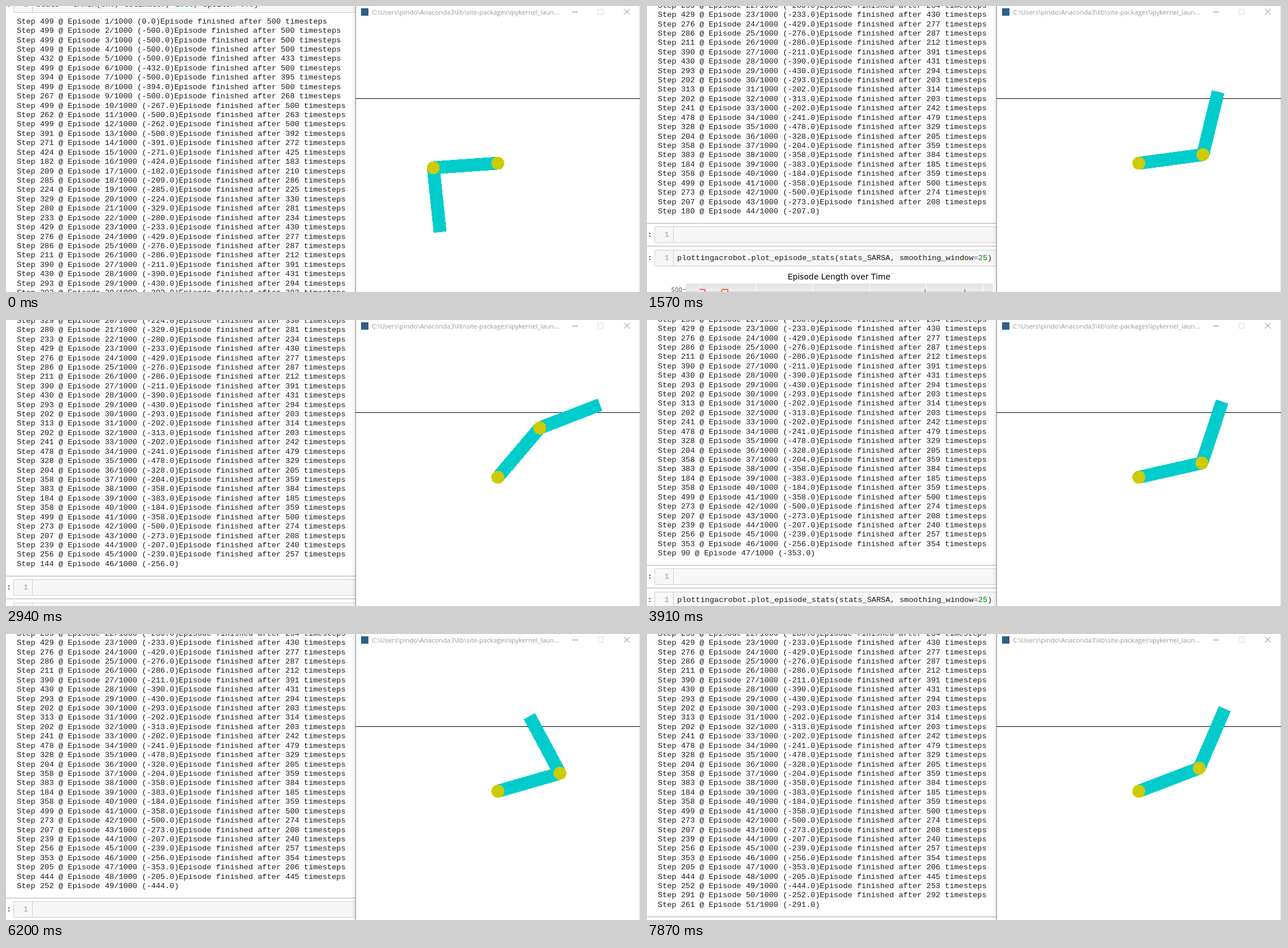
Write an HTML page that moves like this. It is 1116 px wide and 502 px high and loops after 7990 ms.

```html
<!DOCTYPE html>
<html lang="en">
<head>
<meta charset="utf-8">
<title>Acrobot training</title>
<style>
html, body { margin: 0; width: 100%; height: 100%; overflow: hidden; background: #fff; }
#stage { position: relative; width: 1116px; height: 502px; overflow: hidden; background: #fff; }
#stage div, pre, svg { position: absolute; margin: 0; }
pre, .code, .num, .prompt {
  font: 13.57px/16.42px "Liberation Mono", "Courier New", monospace;
  white-space: pre; color: #1c1c1c;
}
#notebook { left: 0; top: 0; width: 614px; height: 502px; overflow: hidden; }
#log { left: 19px; top: 19.8px; }
#page, #below { left: 0; top: 0; width: 614px; }
.rule { left: 0; width: 614px; height: 1px; background: #ababab; }
.cell {
  left: 13px; width: 620px; height: 27px;
  border: 1px solid #cfcfcf; border-radius: 2px; background: #f7f7f7;
}
.gutter { left: 0; top: 0; width: 32px; height: 27px; border-right: 1px solid #cfcfcf; }
#stage .num { right: 7px; top: 6px; color: #999; }
.code { left: 39px; top: 6px; }
#stage .prompt { left: -13px; top: 6px; color: #000080; }
.code i { font-style: normal; color: #aa22ff; }
.code b { font-weight: normal; color: #008800; }
#window {
  left: 614px; top: 0; width: 499px; height: 502px; background: #fff;
  border-left: 1px solid #8c8c8c; border-right: 1px solid #a0a0a0;
  box-shadow: -2px 0 5px rgba(0, 0, 0, .14);
}
#title {
  left: 28px; top: 2px; white-space: nowrap; color: #999;
  font: 11.5px/17px "Open Sans", "Noto Sans", sans-serif;
}
#icon { left: 9px; top: 4px; width: 13px; height: 13px; background: #2f5f86; }
svg { left: 0; top: 0; }
</style>
</head>
<body>
<div id="stage">
  <div id="notebook">
    <div id="page">
      <div class="cell" style="top:-17px">
        <div class="gutter"><div class="num">1</div></div>
        <div class="prompt">:</div>
        <div class="code">stats = SARSA(env, estimator, <b>1000</b>, epsilon<i>=</i><b>0.0</b>)</div>
      </div>
      <pre id="log"></pre>
      <div id="below">
        <div class="rule" style="top:0"></div>
        <div class="cell" style="top:6px">
          <div class="gutter"><div class="num">1</div></div>
          <div class="prompt">:</div>
        </div>
        <div class="rule" style="top:40px"></div>
        <div class="cell" style="top:47px">
          <div class="gutter"><div class="num">1</div></div>
          <div class="prompt">:</div>
          <div class="code">plottingacrobot.plot_episode_stats(stats_SARSA, smoothing_window<i>=</i><b>25</b>)</div>
        </div>
        <svg style="top:80px" width="614" height="140" font-family="DejaVu Sans, sans-serif">
          <text x="337.5" y="19" font-size="13.9" text-anchor="middle">Episode Length over Time</text>
          <path d="M68 26H608V140H68Z" fill="#e5e5e5"/>
          <path d="M92.5 26V140M191.5 26V140M291.5 26V140M391.5 26V140M490.5 26V140M590.5 26V140M68 36.5H608" stroke="#fff"/>
          <path d="M64 36.5H68" stroke="#555"/>
          <text x="62" y="40.5" font-size="10.2" fill="#555" text-anchor="end">500</text>
          <path d="M92 36.5H102V140M130 42L132 36.5H142V140M489 140V36M558.5 140V36" fill="none" stroke="#e24a33" stroke-width="1.4"/>
        </svg>
      </div>
    </div>
  </div>
  <div id="window">
    <div id="icon"></div>
    <div id="title">C:\Users\pindo\Anaconda3\lib\site-packages\ipykernel_laun...</div>
  </div>
  <svg width="1116" height="502">
    <g fill="none" shape-rendering="crispEdges">
      <path d="M995 10.5H1005" stroke="#888"/>
      <path d="M1040.5 5.5H1049.5V14.5H1040.5Z" stroke="#ddd"/>
      <path d="M614 162.5H1114" stroke="#000"/>
    </g>
    <path d="M1086 5L1096 15M1096 5L1086 15" stroke="#888"/>
    <defs>
      <g id="link">
        <rect y="-11.36" width="113.6" height="22.72" fill="#00cccc"/>
        <circle r="11.36" fill="#cccc00"/>
      </g>
    </defs>
    <g id="upper" shape-rendering="crispEdges">
      <use href="#link"/>
      <use href="#link" id="lower"/>
    </g>
  </svg>
</div>
<script>
const LOOP = 7990, REFRESH = 135, ROW = 16.42, LINK = 113.6;
const $ = id => document.getElementById(id);

// The text of the log: the last step reached in each episode.
const lastSteps = [
  499, 499, 499, 499, 432, 499, 394, 499, 267, 499, 262, 499, 391, 271, 424, 182, 209,
  285, 224, 329, 280, 233, 429, 276, 286, 211, 390, 430, 293, 202, 313, 202, 241, 478,
  328, 204, 358, 383, 184, 358, 499, 273, 207, 239, 256, 353, 205, 444, 252, 291, 499];
const starts = [0];
lastSteps.forEach((s, i) => starts.push(starts[i] + s + 1));

// The screen freezes during these spans.
const stalls = [[160, 870], [2510, 2940], [5670, 5950], [6200, 6470]];

// Steps run at a nearly even pace through these points: time, episode, step.
const progress = [
  [0, 42, 235], [1545, 44, 180], [2510, 45, 256], [2940, 46, 144], [3885, 47, 90],
  [5370, 48, 432], [6200, 49, 252], [7010, 50, 264], [7820, 51, 261]
].map(([t, episode, step]) => [t, starts[episode - 1] + step]);

const scroll = [[700, 0], [1140, 373], [2510, 373], [2940, 338], [3210, 373]];

// Link angles; the arm is redrawn only as an episode ends.
const FIRST_POSE = 42, POSE_LEAD = 20;
const poses = [
  [176, 84], [-63, -113], [-7.6, -76.4], [-12, -70], [-49.6, -21.1],
  [-12.7, -71.7], [-18, -85], [-8.6, -60], [-16.1, -118.2], [-20.9, -66.7]];

function interpolate(keys, t) {
  const i = keys.findIndex(k => k[0] >= t);
  if (i < 0) return keys[keys.length - 1][1];
  if (i === 0) return keys[0][1];
  const [t0, a] = keys[i - 1], [t1, b] = keys[i];
  return a + (b - a) * (t - t0) / (t1 - t0);
}

function lastRefresh(t) {
  let resumed = 0;
  for (const [from, to] of stalls) {
    if (t < from) break;
    if (t < to) return from;
    resumed = to;
  }
  return resumed + Math.floor((t - resumed) / REFRESH) * REFRESH;
}

const episodeAt = steps => starts.filter(s => s <= steps).length;

function reward(episode) {
  if (episode === 1) return "0.0";
  const last = lastSteps[episode - 2];
  return `-${last === 499 ? 500 : last}.0`;
}

const row = (episode, step) => `Step ${step} @ Episode ${episode}/1000 (${reward(episode)})`;
const finished = lastSteps.map((s, i) => `${row(i + 1, s)}Episode finished after ${s + 1} timesteps`);

let shown = -1;
function draw(now) {
  const time = lastRefresh(now % LOOP);
  if (time !== shown) {
    shown = time;
    const steps = Math.floor(interpolate(progress, time) + 1e-6);
    const episode = episodeAt(steps);
    $("log").textContent =
      [...finished.slice(0, episode - 1), row(episode, steps - starts[episode - 1])].join("\n");
    $("below").style.top = `${Math.round(47.7 + ROW * (episode - 1))}px`;
    $("page").style.top = `${-Math.round(interpolate(scroll, time))}px`;

    const pose = Math.min(episodeAt(steps + POSE_LEAD) - FIRST_POSE, poses.length - 1);
    const [upper, lower] = poses[pose];
    $("upper").setAttribute("transform", `translate(864.4 276) rotate(${upper})`);
    $("lower").setAttribute("transform", `translate(${LINK} 0) rotate(${lower - upper})`);
  }
  requestAnimationFrame(draw);
}
draw(performance.now());
</script>
</body>
</html>
```
